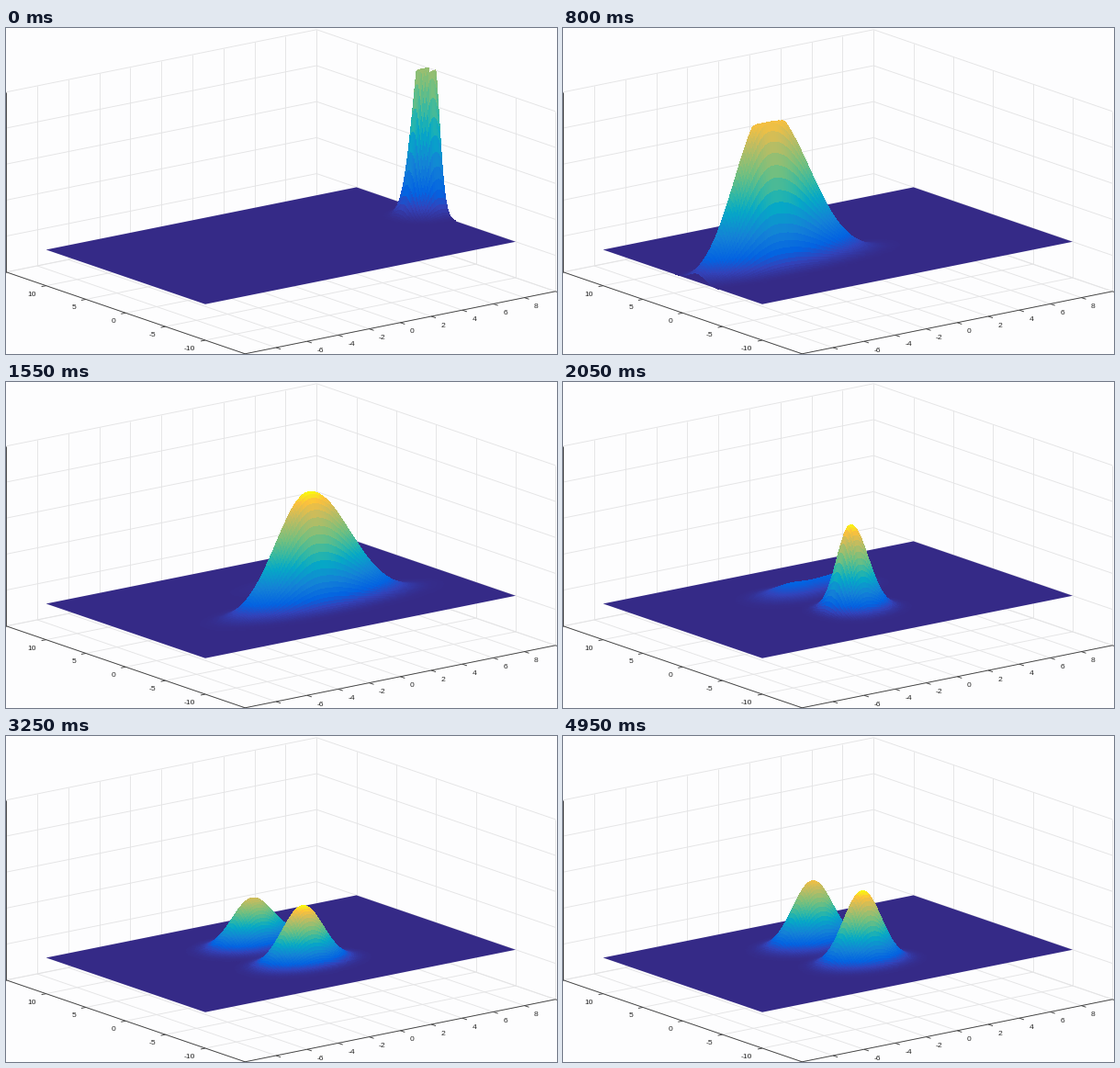
Write a matplotlib script that moves like this. It is 600 by 355 pixels and loops after 5 s.

```python
import numpy as np
import matplotlib.pyplot as plt
from matplotlib.animation import FuncAnimation
from matplotlib.collections import LineCollection, PolyCollection
from matplotlib.colors import LinearSegmentedColormap

W, H, DPI = 600, 355, 100
FRAMES, STEP = 100, 50
Z_UNIT = 39.2            # pixels per height division
LOW, HIGH = -Z_UNIT, 4 * Z_UNIT
CELLS = 160
INK, TEXT, GRID, PAPER = "#404040", "#262626", "#e4e4e5", "#fdfdfe"

PARULA = LinearSegmentedColormap.from_list("parula", [
    (0, "#352a87"), (.06, "#3243ba"), (.127, "#0363e1"), (.25, "#1481d6"),
    (.40, "#06a8c6"), (.49, "#2eb7a6"), (.62, "#71bf80"), (.81, "#c8bc5d"),
    (.92, "#fcc03c"), (1, "#f9fb0e")], N=512)


def project(x, y, z=0.0):
    """Orthographic view; z is in pixels above the sheet."""
    a, b = np.asarray(x) + 10, np.asarray(y) + 15
    return (260.3 + 16.9 * a - 8.667 * b,
            355.6 - .8 - Z_UNIT - 3.4 * a - 2.967 * b - z)


def glide(t, *keys):
    """Cosine easing through (time, value) points."""
    times, vals = zip(*keys)
    t = min(max(t, times[0]), times[-1])
    i = min(np.searchsorted(times, t, side="right"), len(times) - 1) - 1
    p = (t - times[i]) / (times[i + 1] - times[i])
    return vals[i] + (vals[i + 1] - vals[i]) * (1 - np.cos(np.pi * p)) / 2


def pulse(t, mid, width):
    return np.exp(-((t - mid) / width) ** 2)


# Far cells come first, so nearer ones paint over them.
axis = np.linspace(10, -10, CELLS + 1)
X, Y = np.meshgrid(axis, axis)


def hump(x, y, height, left, right, depth, flat=.02):
    """Bell with its own width on each side; flat > 0 makes it a dome."""
    u = (X - x) / np.where(X < x, left, right)
    bell = np.clip(1 - flat * u**2 / 2, 0, None) ** (1 / flat)
    return height * bell * np.exp(-((Y - y) / depth) ** 2 / 2)


def front_hump(t):
    """Swings once round the sheet, then breathes in the near well."""
    x = glide(t, (0, 9.6), (560, -8.4), (1200, .8), (2050, -.77), (3800, -.05))
    y = glide(t, (0, .45), (350, 4.8), (950, -3), (2700, -3.17))
    height = glide(t, (0, 220), (850, 172), (1150, 93), (1500, 126),
                   (2700, 51), (3600, 68), (4950, 78))
    width = glide(t, (0, .65), (450, .92), (1150, 2.95), (2050, .7),
                  (2700, 1.3), (3800, 1.07))
    skew = glide(t, (0, 1), (450, 1.55), (1150, 1.17), (2050, 1.4), (2700, 1))
    depth = glide(t, (0, .8), (1000, 1), (2700, 1.1))
    return hump(x, y, height, width, width * skew, depth,
                .02 + .64 * pulse(t, 1150, 220))


def rear_hump(t):
    """Grows in the far well, with a side lobe that fades away."""
    x = glide(t, (2300, -1.4), (3850, .25), (4950, 0))
    height = glide(t, (1700, 0), (2700, 40), (3600, 52), (4300, 70))
    return (hump(x, 3.17, height, 1.15, 1.15, 1.1)
            + hump(1.8, 3.17, 24 * pulse(t, 2600, 700), 1.5, .95, 1))


def corners(a):
    return np.stack([a[:-1, :-1], a[:-1, 1:], a[1:, 1:], a[1:, :-1]], axis=-1)


def faces(t):
    z = front_hump(t) + rear_hump(t)
    cut = np.minimum(z, HIGH)
    quad = corners(cut)
    seen = (quad.max(-1) > .3) & (quad.min(-1) < HIGH)
    sx, sy = project(X, Y, cut)
    verts = np.stack([corners(sx)[seen], corners(sy)[seen]], axis=-1)
    return verts, PARULA(quad[seen].mean(-1) / z.max())


fig = plt.figure(figsize=(W / DPI, H / DPI), dpi=DPI, facecolor=PAPER)
ax = fig.add_axes([0, 0, 1, 1])
ax.set_xlim(0, W)
ax.set_ylim(H, 0)
ax.axis("off")


def segment(p, q):
    return [project(*p), project(*q)]


def lines(segs, color, order):
    ax.add_collection(LineCollection(segs, colors=color, linewidths=.65,
                                     zorder=order))


xs, ys = np.arange(-10, 11, 2), np.arange(-15, 16, 5)
grid = []
for x in xs:
    grid += [segment((x, 15, LOW), (x, 15, HIGH)),
             segment((x, -15, LOW), (x, 15, LOW))]
for y in ys:
    grid += [segment((10, y, LOW), (10, y, HIGH)),
             segment((-10, y, LOW), (10, y, LOW))]
for z in np.linspace(LOW, HIGH, 6):
    grid += [segment((-10, 15, z), (10, 15, z)),
             segment((10, 15, z), (10, -15, z))]
lines(grid, GRID, 1)

frame = [segment((-10, 15, LOW), (-10, -15, LOW)),
         segment((-10, -15, LOW), (10, -15, LOW)),
         segment((-10, 15, LOW), (-10, 15, HIGH))]
font = dict(family="Liberation Sans", size=6.1, color=TEXT, va="center",
            clip_on=True)
for x in xs:
    px, py = project(x, -15, LOW)
    frame.append([(px, py), (px + 5, py + 1.7)])
    if -8 < x < 10:
        ax.text(px + 10.5, py + 10, f"{x}", ha="left", **font)
for y in ys:
    px, py = project(-10, y, LOW)
    frame.append([(px, py), (px - 5, py + 1)])
    if -15 < y < 15:
        ax.text(px - 10.5, py + 9.5, f"{y}", ha="right", **font)
lines(frame, INK, 2)

sheet = np.column_stack(project([-10, -10, 10, 10], [10, -10, -10, 10]))
ax.add_patch(plt.Polygon(sheet, facecolor=PARULA(0), edgecolor="none",
                         zorder=3))
surface = PolyCollection([], edgecolors="none", antialiaseds=False, zorder=4)
ax.add_collection(surface, autolim=False)


def draw(i):
    verts, colors = faces(i * STEP)
    surface.set_verts(verts)
    surface.set_facecolor(colors)
    return [surface]


anim = FuncAnimation(fig, draw, frames=FRAMES, interval=STEP, repeat=True,
                     repeat_delay=0, blit=False)
plt.show()
```
